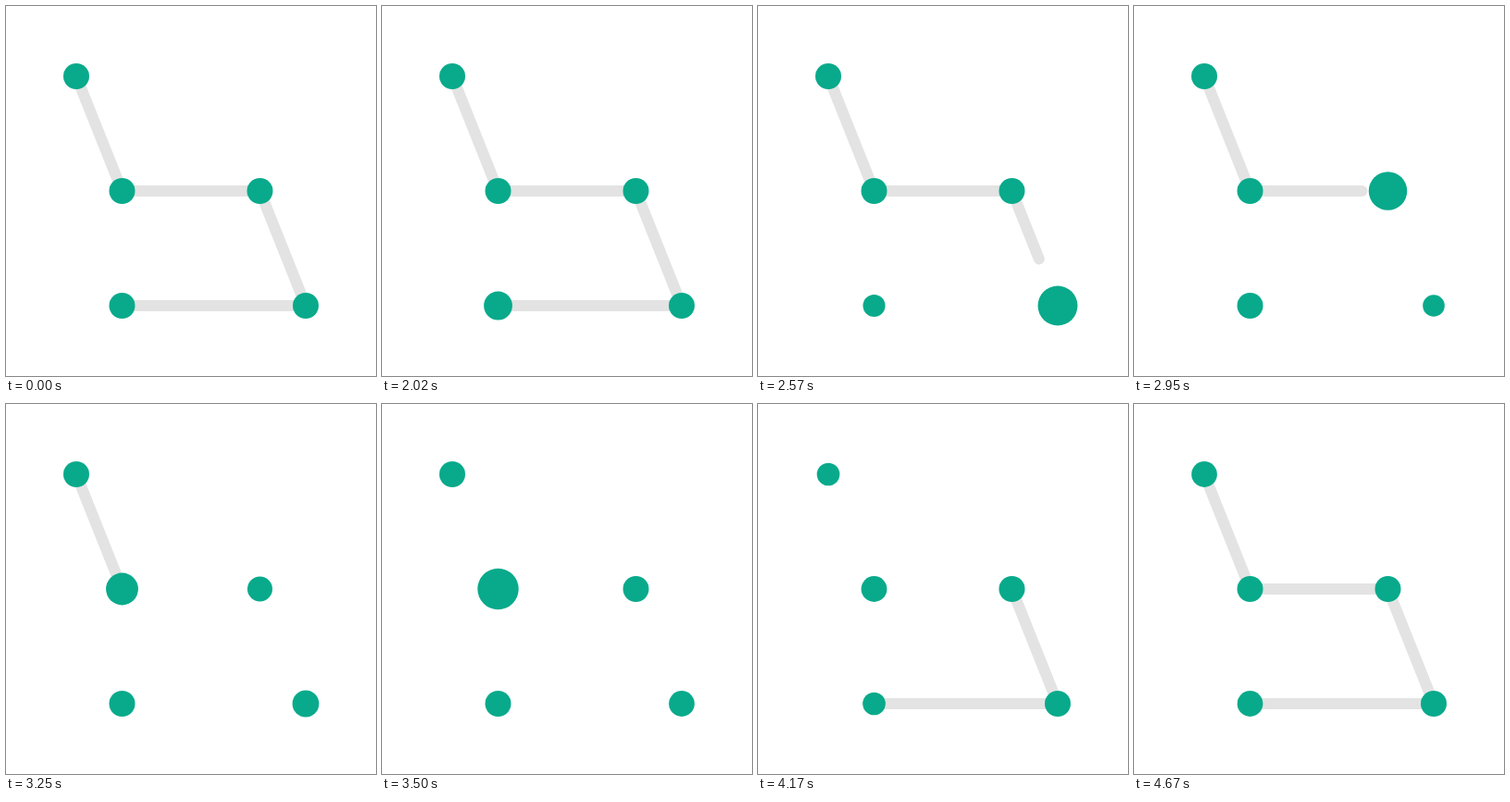
Animation of 400 by 400 pixels, one loop 4.7 s. Source, as an HTML page with a canvas:

```html
<!DOCTYPE html>
<html lang="en">
<head>
<meta charset="utf-8">
<style>
  html, body { margin: 0; width: 100%; height: 100%; overflow: hidden; background: #fff; }
  canvas { display: block; }
</style>
</head>
<body>
<canvas width="400" height="400"></canvas>
<script>
const ctx = document.querySelector('canvas').getContext('2d');
const LOOP = 4700;
const RADIUS = 14, SWELL = 8.5;
const RISE = 300, ERASE = 360, DRAW = 260;

const points = [[125.5, 324], [324, 324], [274.5, 200], [125.5, 200], [76, 76]];
const starts = [2000, 2400, 2810, 3195, 3580];
const redraw = starts[4];

const progress = (t, start, duration) => Math.min(1, Math.max(0, (t - start) / duration));
const easeInOut = p => p < 0.5 ? 8 * p ** 4 : 1 - 8 * (1 - p) ** 4;
const mix = (a, b, p) => a.map((v, i) => v + (b[i] - v) * p);

// Quick swell, then a damped bounce back to rest.
function pulse(t) {
  if (t <= 0) return 0;
  if (t < RISE) return SWELL * (1 - (1 - t / RISE) ** 2.5);
  const x = t - RISE;
  return SWELL * Math.exp(-0.0054 * x) * Math.cos(Math.PI * x / 262);
}

function drawLine(from, to) {
  ctx.beginPath();
  ctx.moveTo(...from);
  ctx.lineTo(...to);
  ctx.stroke();
}

function drawDot([x, y], radius) {
  ctx.beginPath();
  ctx.arc(x, y, radius, 0, Math.PI * 2);
  ctx.fill();
}

function render(t) {
  ctx.fillStyle = '#fff';
  ctx.fillRect(0, 0, 400, 400);
  ctx.strokeStyle = '#e3e3e3';
  ctx.lineWidth = 12;
  ctx.lineCap = 'round';

  for (let i = 0; i < 4; i++) {
    const [a, b] = [points[i], points[i + 1]];
    const erased = easeInOut(progress(t, starts[i], ERASE));
    const drawn = easeInOut(progress(t, redraw + i * DRAW, DRAW));
    if (erased < 1) drawLine(mix(a, b, erased), b);
    if (drawn > 0) drawLine(a, mix(a, b, drawn));
  }

  ctx.fillStyle = '#08aa8b';
  points.forEach((point, i) => {
    const start = i === 0 && t >= redraw ? redraw : starts[i];
    drawDot(point, RADIUS + pulse(t - start));
  });
}

const origin = performance.now();
function frame() {
  render((performance.now() - origin) % LOOP);
  requestAnimationFrame(frame);
}
frame();
</script>
</body>
</html>
```
